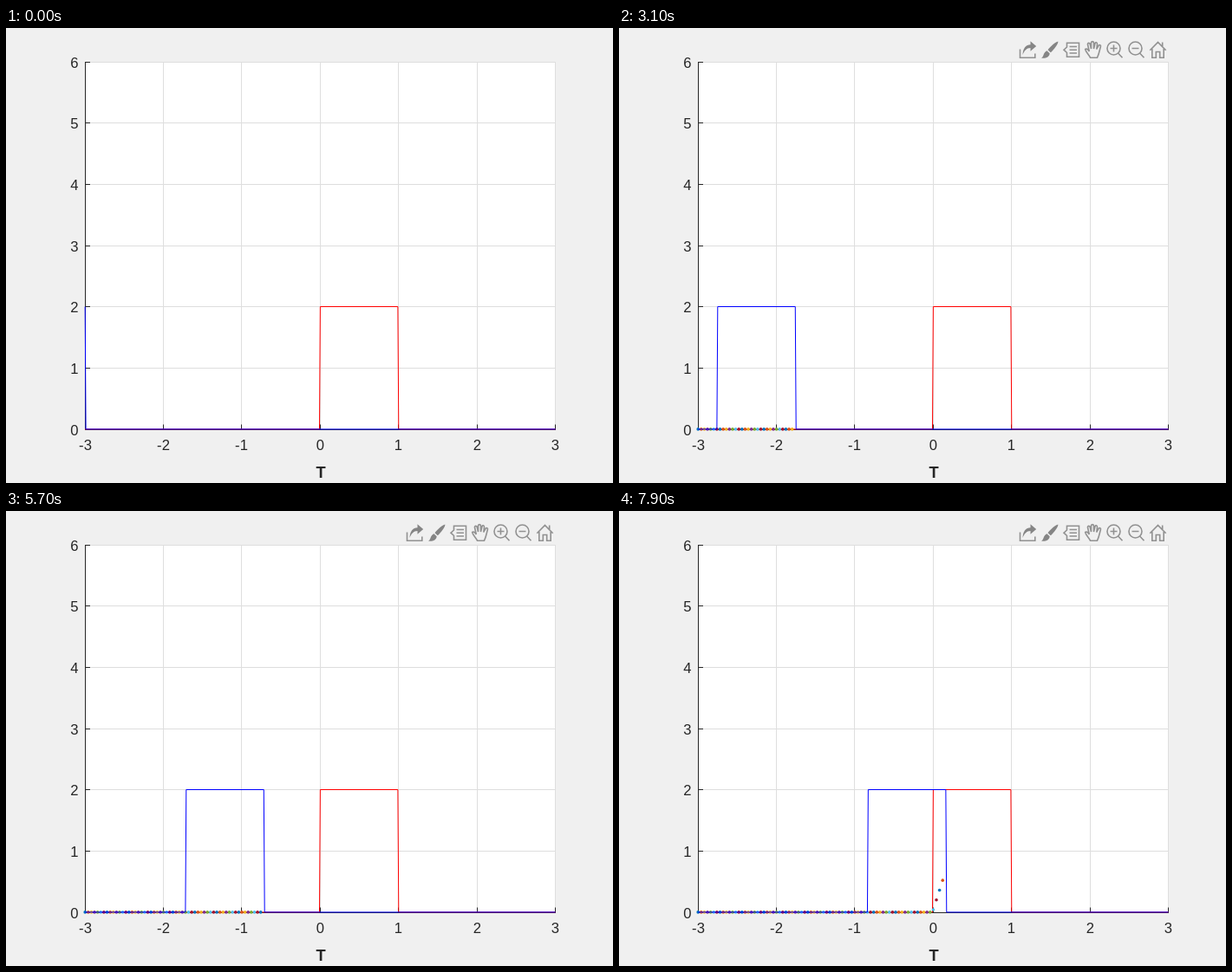
These frames come from a looping animation (700x525 px, 8 s). An HTML page:

```html
<!DOCTYPE html>
<html lang="en">
<head>
<meta charset="utf-8">
<title>Convolution of two pulses</title>
<style>
  html, body { margin: 0; width: 100%; height: 100%; overflow: hidden; background: #f0f0f0; }
  svg { display: block; }
  text { font: 16.67px "Liberation Sans", Arial, sans-serif; fill: #262626; text-anchor: middle; }
  .y { text-anchor: end; }
  .title { font-size: 18.3px; font-weight: bold; }
  path { fill: none; }
  #grid { stroke: #dedede; }
  #axes { stroke: #262626; }
  #red { stroke: #f00; }
  #blue { stroke: #00f; }
  #tools { stroke: #919191; stroke-width: 1.6; }
  #tools .solid { fill: #858585; stroke: none; }
</style>
</head>
<body>
<svg width="700" height="525" viewBox="0 0 700 525">
  <rect x="91" y="39" width="543" height="424" fill="#fff"/>
  <path id="grid"/>
  <path id="axes"/>
  <g id="labels"><text class="title" x="363" y="519">T</text></g>
  <path id="red"/>
  <g id="dots"></g>
  <path id="blue"/>
  <g id="tools">
    <path d="M462.5 24.500V34.200H479.800V29.500"/>
    <path class="solid" d="M465.500 31C466 23 469 19.500 474.500 19.200V15.300L481.200 21L474.500 26.700V23C470 23 467.500 26 465.500 31Z"/>
    <path class="solid" d="M506.300 15.500C507 18 501.500 25 497.800 28.300L494.500 25.200C498 21 503 16 506.300 15.500ZM493.500 26.200L496.700 29.300C496.500 33.500 492 35.500 487 34.700C490 33 489.500 27.500 493.500 26.200Z"/>
    <path d="M516.500 17.300H530.500V33.200H516.500V28.500L513 25.200L516.500 22ZM519.500 21.500H528M519.500 25.300H528M519.500 29H528"/>
    <path d="M543.500 34.200C541.500 30 538 27.500 537.700 24.500C539.500 23.200 541 25 542.300 27L540.500 19C540.300 17 542.800 16.800 543.300 18.700L544.500 24V17C544.700 15.200 547.300 15.200 547.500 17V24L549 17.700C549.500 16 551.700 16.500 551.500 18.500L550.800 24.500L553 20.300C554 18.800 556 19.800 555.400 21.500C554 26 553.700 30 551.500 34.200Z"/>
    <path d="M575.500 29L580.500 34.300M566.500 23.500H574.500M570.500 19.500V27.500M600.500 29L605.500 34.300M591.500 23.500H599.500"/>
    <circle cx="570.5" cy="23.500" r="7.500" fill="none"/>
    <circle cx="595.5" cy="23.500" r="7.500" fill="none"/>
    <path d="M612.300 25.800L621.500 16.500L630.700 25.800M614.800 24V34.300H619.300V27.500H623.700V34.300H628.200V24M626.700 21V16.500"/>
  </g>
</svg>
<script>
const $ = id => document.getElementById(id);
const X = t => 91.2 + 90.4 * (t + 3);
const Y = v => 462.9 - 70.7 * v;
const STEP = 0.04, DT = 0.01, COUNT = 80;
const COLORS = ['#0072bd', '#d95319', '#edb120', '#7e2f8e', '#77ac30', '#4dbeee', '#a2142f'];

function add(parent, tag, attrs, text = '') {
  const el = document.createElementNS('http://www.w3.org/2000/svg', tag);
  for (const key in attrs) el.setAttribute(key, attrs[key]);
  el.textContent = text;
  parent.append(el);
  return el;
}

// Grid, ticks and tick labels
let grid = '', axes = 'M91.5 39V463.5H634';
for (let i = 0; i <= 6; i++) {
  const x = Math.floor(91 + 90.42 * i) + 0.5;
  const y = Math.floor(463.3 - 70.67 * i) + 0.5;
  grid += `M${x} 39V463M91 ${y}H634`;
  axes += `M${x} 463.5v-6M91.5 ${y}h5.5`;
  add($('labels'), 'text', { x, y: 487 }, i - 3);
  add($('labels'), 'text', { x: 83.5, y: y + 6.5, class: 'y' }, i);
}
$('grid').setAttribute('d', grid);
$('axes').setAttribute('d', axes);

// Sampled pulse of height 2: edges take one sample to rise or fall
function pulse(rise, fall) {
  const points = [];
  if (rise - DT > -3) points.push([-3, 0], [rise - DT, 0]);
  points.push([Math.max(rise, -3), 2], [fall, 2], [fall + DT, 0], [3, 0]);
  return 'M' + points.map(([t, v]) => `${X(t)} ${Y(v)}`).join('L');
}
$('red').setAttribute('d', pulse(0, 0.99));

const dots = Array.from({ length: COUNT - 1 }, (_, k) => {
  const t = -3 + STEP * k;
  const area = t > -DT / 2 ? 4 * (t + DT) : 0;
  return add($('dots'), 'circle', { cx: X(t), cy: Y(area), r: 1.8, fill: COLORS[k % 7] });
});

function draw(now) {
  const n = Math.floor(now / 100) % COUNT;
  const edge = -3 + STEP * n;
  $('blue').setAttribute('d', pulse(edge - 0.99, edge));
  dots.forEach((dot, k) => dot.style.display = k < n ? '' : 'none');
  $('tools').style.display = n ? '' : 'none';
}

const start = performance.now();
function loop() {
  draw(performance.now() - start);
  requestAnimationFrame(loop);
}
loop();
</script>
</body>
</html>
```
